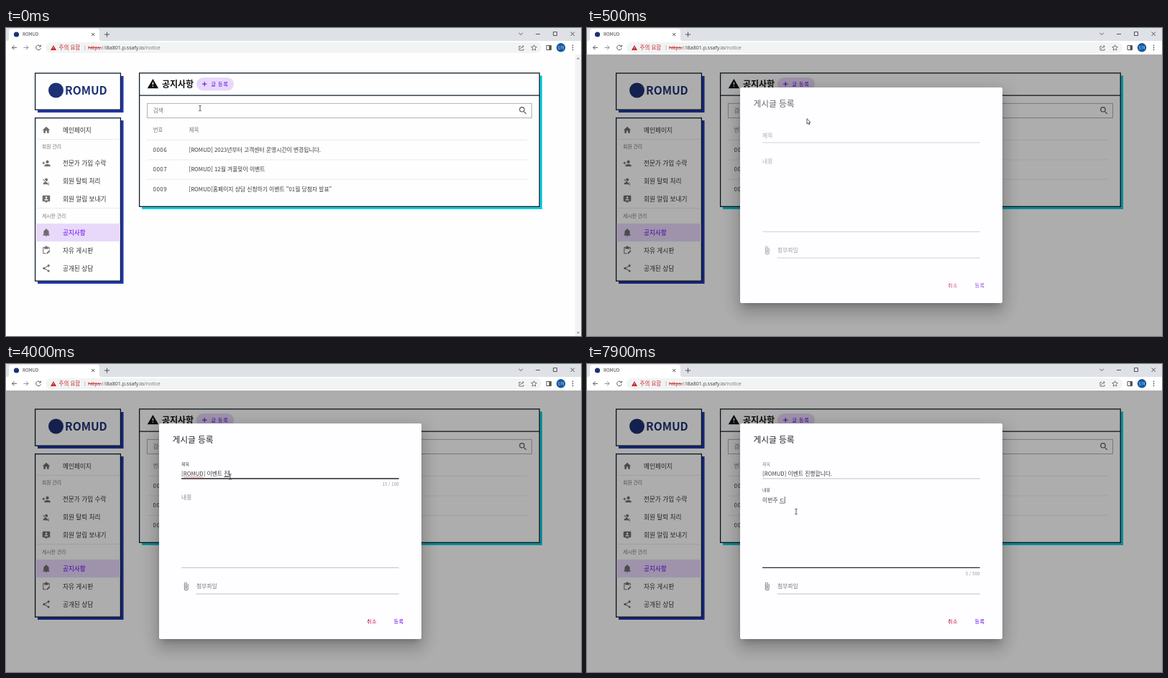
An HTML page for the animation above (8 s loop, 800 by 430 pixels).

```html
<!DOCTYPE html>
<html lang="ko">
<head>
<meta charset="utf-8">
<title>ROMUD</title>
<style>
html, body { margin: 0; width: 800px; height: 430px; overflow: hidden; background: #fefefe; }
body { position: relative; font-family: "Noto Sans CJK KR", "Noto Sans KR", "Open Sans", sans-serif; }
svg { position: absolute; left: 0; top: 0; display: block; }
text { white-space: pre; font-size: 7.8px; fill: #3c3c3e; }
.url { font: 7.04px "Open Sans", "Noto Sans", sans-serif; }
.line { fill: none; stroke: #555; stroke-width: 1; }
.box { fill: #fefefe; stroke: #0c1c28; stroke-width: 1.3; }
.rule { stroke: #e2e2e4; stroke-width: .7; }
.item { font-size: 8.65px; fill: #333; }
.group { font-size: 6.85px; fill: #777; }
.dim { fill: #77777a; }
.on { fill: #6200ee; }
.icon { fill: #6e6e70; fill-rule: evenodd; }
.btn { font-size: 7px; letter-spacing: .6px; font-weight: 500; }
.count { font-size: 5.8px; letter-spacing: .2px; fill: #8d8d90; text-anchor: end; }
.under { stroke: #a4a4a6; stroke-width: .7; }
.focus { stroke: #2c2c2e; stroke-width: 1.3; }
.typing { text-decoration: underline; text-decoration-thickness: .6px; text-underline-offset: 1.2px; }
#scrim { position: absolute; left: 0; top: 37px; width: 800px; height: 393px; background: #000; }
#dialog {
  position: absolute; left: 213.4px; top: 83.4px; width: 364.6px; height: 301px;
  background: #fefdff; border-radius: 2px;
  box-shadow: 0 6px 8px -4px #0003, 0 13px 20px 2px #00000024, 0 5px 25px 4px #0000001f;
}
</style>
</head>
<body>
<svg width="800" height="430">
  <!-- browser frame -->
  <rect width="800" height="18" fill="#dee1e6"/>
  <path d="M1 18q3 0 3-3V5q0-4 4-4H126q4 0 4 4V15q0 3 3 3z" fill="#fff"/>
  <circle cx="14.5" cy="9" r="3.6" fill="#1d3174"/>
  <text x="23" y="11.4" style="font-size:6.2px">ROMUD</text>
  <path class="line" d="M119.2 7l4 4m0-4l-4 4M137 9h7m-3.500-3.500v7"/>
  <path class="line" stroke-width=".8" d="M713.500 6.800l2.700 2.700 2.700-2.700M737 8.500h6M761.500 5.500h5v5h-5zM785.500 5.500l5.500 5.500m0-5.500l-5.500 5.500"/>
  <rect y="18" width="800" height="19" fill="#fff"/>
  <rect x="55" y="20" width="690" height="15" rx="7.500" fill="#f1f3f4"/>
  <path class="line" d="M15 27.300H8.500m3-3l-3 3 3 3"/>
  <path class="line" d="M24.500 27.300H31m-3-3l3 3-3 3" style="stroke:#888"/>
  <path class="line" d="M47.500 25.200a3.300 3.300 0 1 0 .7 3M48.300 23.500v2.500h-2.500"/>
  <path d="M66 24l4 7h-8zM65.600 26.300v2.300h.8v-2.300zM65.600 29.200v.8h.8v-.8z" fill="#c5221f" fill-rule="evenodd"/>
  <text x="73.500" y="30" style="font-size:7.5px;fill:#c5221f">주의 요함</text>
  <path d="M110 24v7" stroke="#aaa" stroke-width=".7"/>
  <text class="url" x="114" y="30.200"><tspan fill="#c5221f" text-decoration="line-through">https:</tspan><tspan fill="#777">//</tspan>i8a801.p.ssafy.io<tspan fill="#777">/notice</tspan></text>
  <path class="line" style="stroke-width:.8" d="M716 25.500h-2v5.500h6v-2M716 29q.3-3.300 4-3.300m-1.500-1.700l1.800 1.700-1.800 1.700"/>
  <path class="line" style="stroke-width:.8" d="M734.500 23.700l1.100 2.500 2.700.3-2 1.900.5 2.700-2.300-1.400-2.300 1.400.5-2.700-2-1.900 2.700-.3z"/>
  <path class="line" d="M752 24.500h6.500v6H752z"/><path d="M755.500 24.500h3v6h-3z" fill="#555"/>
  <circle cx="772" cy="27.300" r="6.200" fill="#1259a0"/>
  <text x="772" y="29" text-anchor="middle" style="font-size:4.6px;fill:#fff">도아</text>
  <g fill="#555"><circle cx="788.500" cy="24.300" r=".9"/><circle cx="788.500" cy="27.300" r=".9"/><circle cx="788.500" cy="30.300" r=".9"/></g>

  <g id="scrollbar"><rect x="791.500" y="37" width="8.500" height="393" fill="#f3f3f4"/><path d="M794 43.500l2-2.500 2 2.500zM794 424.500l2 2.500 2-2.500z" fill="#888"/></g>

  <!-- side column -->
  <g fill="#2036ab"><rect x="44" y="67" width="119.500" height="51"/><rect x="44" y="129" width="119.500" height="228"/></g>
  <rect class="box" x="40.600" y="63.100" width="118.800" height="51"/>
  <rect class="box" x="40.600" y="125.600" width="118.800" height="227.600"/>
  <circle cx="69.500" cy="87" r="10.500" fill="#1d3174"/>
  <text x="82" y="93" style="font-size:15.600px;font-weight:700;fill:#1d3174">ROMUD</text>
  <path class="rule" d="M41 155.500H159M41 251.500H159"/>
  <text class="group" x="50" y="168.300">회원 관리</text>
  <text class="group" x="50" y="264.700">게시판 관리</text>
  <rect x="41.300" y="273" width="117.500" height="25" fill="#e8d9fb"/>
  <g id="menu"></g>

  <!-- notice list -->
  <rect x="189" y="66.500" width="557" height="186.500" fill="#10ccdc"/>
  <rect class="box" x="185.600" y="62.900" width="556.600" height="186.400"/>
  <path d="M185 94.200H742" stroke="#0c1c28" stroke-width="1.200"/>
  <path transform="translate(196 69.500) scale(.7)" d="M1 21h22L12 2zM13 18h-2v-2h2zM13 14h-2V9h2z" fill="#111" fill-rule="evenodd"/>
  <text x="217" y="82.600" style="font-size:12px;font-weight:700;fill:#111">공지사항</text>
  <rect id="add" x="265" y="69" width="52" height="18.500" rx="9.250" fill="#e8d9fb"/>
  <path d="M273 78.200h6.400m-3.200-3.200v6.400" stroke="#6200ee"/>
  <text class="btn on" x="285.500" y="80.800">글 등록</text>
  <rect x="196.500" y="105.300" width="535" height="20.200" fill="none" stroke="#a0a0a2" stroke-width=".8"/>
  <text class="dim" x="204.700" y="118.200" style="font-size:7.700px">검색</text>
  <path class="line" style="stroke-width:1.200" d="M720.500 116.600l3.300 3.300"/><circle class="line" style="stroke-width:1.200" cx="717.900" cy="113.800" r="3.200"/>
  <text class="dim" x="204.700" y="145" style="font-size:7.500px">번호</text>
  <text class="dim" x="254.500" y="145" style="font-size:7.600px">제목</text>
  <path class="rule" d="M196 156.400H725M196 184H725M196 211.300H725"/>
  <g id="rows"></g>
</svg>

<div id="scrim"></div>
<div id="dialog">
  <svg id="form" width="364.600" height="301" viewBox="213.400 83.400 364.600 301">
    <text x="232" y="110.500" style="font-size:11.700px;font-weight:500;fill:#222">게시글 등록</text>
    <g id="fields"></g>
    <path class="icon" transform="translate(244.500 304.500) scale(.53)" d="M16.500 6v11.500a4 4 0 01-8 0V5a2.500 2.500 0 015 0v10.500a1 1 0 01-2 0V6H10v9.500a2.500 2.500 0 005 0V5a4 4 0 00-8 0v12.500a5.500 5.500 0 0011 0V6z"/>
    <text class="dim" x="265.500" y="313.700">첨부파일</text>
    <path class="under" d="M265 321.400H547"/>
    <text class="btn" x="502.500" y="362.500" style="fill:#b8002e">취소</text>
    <text class="btn on" x="540" y="362.500">등록</text>
  </svg>
</div>

<svg width="800" height="430">
  <g id="cursor" stroke-width=".8">
    <path data-kind="beam" d="M-1.800-3.800q1.800 0 1.800.8V3q0 .8-1.800.8M1.800-3.800Q0-3.800 0-3M0 3q0 .8 1.800.8" fill="none" stroke="#333"/>
    <path data-kind="arrow" d="M0 0V7.400L1.700 5.900 2.900 8.400 4 7.900 2.900 5.500H5z" fill="#fff" stroke="#333"/>
  </g>
</svg>

<script>
const LOOP = 8000, STEP = 100, NAME = 'ROMUD';
const $ = id => document.getElementById(id);
const clamp = v => Math.min(1, Math.max(0, v));
const ease = u => 1 - (1 - clamp(u)) ** 1.74;

const menu = [
  [142.5, '메인페이지', 'M10 20v-6h4v6h5v-8h3L12 3 2 12h3v8z'],
  [189, '전문가 가입 수락', 'M15 12a4 4 0 100-8 4 4 0 000 8zM6 10V7H4v3H1v2h3v3h2v-3h3v-2zM15 14c-2.700 0-8 1.300-8 4v2h16v-2c0-2.700-5.300-4-8-4z'],
  [214, '회원 탈퇴 처리', 'M12 4a4 4 0 014 4c0 1.950-1.400 3.600-3.250 3.900L8.100 7.250A4 4 0 0112 4zM12.300 14l6 6L20 21.700 18.700 23l-3-3H4v-2c0-1.800 2.500-3.400 5.900-3.900L2.800 7l1.300-1.200zM20 18v1.200l-4.900-4.900C18 14.900 20 16.350 20 18z'],
  [239, '회원 알림 보내기', 'M20 2H4a2 2 0 00-2 2v12a2 2 0 002 2h5l3 4 3-4h5a2 2 0 002-2V4a2 2 0 00-2-2zM12 5a2.500 2.500 0 110 5 2.500 2.500 0 010-5zM17 15H7v-.8c0-1.700 3.300-2.600 5-2.600s5 .9 5 2.600z'],
  [285.5, '공지사항', 'M21 19v1H3v-1l2-2v-6c0-3.100 2-5.800 5-6.700V4a2 2 0 014 0v.3c3 .9 5 3.600 5 6.700v6zM14 21a2 2 0 01-4 0z'],
  [310.5, '자유 게시판', 'M9 3a3 3 0 016 0h4a2 2 0 012 2v4l-2 2V5h-2v3H7V5H5v14h6v2H5a2 2 0 01-2-2V5a2 2 0 012-2zM20 11.500l2.500 2.500-7 7H13v-2.500z'],
  [335.5, '공개된 상담', 'M18 16.100c-.8 0-1.400.3-2 .8L8.900 12.700a3 3 0 000-1.400l7-4.100A3 3 0 1015 5c0 .24 0 .47.100.7L8 9.800A3 3 0 106 15c.8 0 1.500-.3 2-.8l7.100 4.200A2.900 2.900 0 1018 16.100z']
];
$('menu').innerHTML = menu.map(([y, label, d], i) => {
  const on = i === 4 ? ' on' : '';
  return `<path class="icon${on}" transform="translate(49.700 ${y - 6.3}) scale(.525)" d="${d}"/>
    <text class="item${on}" x="79" y="${y + 3.2}">${label}</text>`;
}).join('');

const rows = [
  ['0006', `[${NAME}] 2023년부터 고객센터 운영시간이 변경됩니다.`],
  ['0007', `[${NAME}] 12월 겨울맞이 이벤트`],
  ['0009', `[${NAME}]홈페이지 상담 신청하기 이벤트 "01월 당첨자 발표"`]
];
$('rows').innerHTML = rows.map(([no, title], i) => {
  const y = 173 + i * 27.3;
  return `<text x="204.500" y="${y}" style="font-size:8px;letter-spacing:.45px">${no}</text><text x="254.500" y="${y}">${title}</text>`;
}).join('');

// Keystrokes: a full syllable replaces the letter being composed, anything else is appended.
const keys = (start, gap, chars) => [...chars].map((ch, i) => [start + i * gap, ch]);
const isSyllable = ch => ch >= '가' && ch <= '힣';
const isHangul = ch => isSyllable(ch) || (ch >= 'ㄱ' && ch <= 'ㅣ');

const fields = [
  { label: '제목', top: 153, low: 160.4, max: 100, from: 1000, to: 5100, keys: [
    ...keys(1500, 200, `[${NAME}]`),
    ...keys(2900, 100, ' ㅇ이ㅂ버벤ㅌ트 ㅈ지진'),
    ...keys(4100, 60, 'ㅎ해행ㅎ하합ㄴ니ㄷ다.')] },
  { label: '내용', top: 189.6, low: 284.8, max: 500, from: 5100, to: LOOP, keys: [
    ...keys(5700, 100, 'ㅇ이'),
    ...keys(6200, 270, 'ㅂ버번ㅈ주 ㄷ')] }
];
$('fields').innerHTML = fields.map(f => `<g>
  <path class="under" d="M244.500 ${f.low}H547"/><path class="focus"/>
  <text class="label"></text>
  <text class="value" x="244.500" y="${f.top + 3.5}"><tspan></tspan><tspan class="typing"></tspan></text>
  <path class="squiggle" fill="none" stroke="#e0303a" stroke-width=".7"/>
  <path class="caret" stroke="#222" stroke-width=".7"/>
  <text class="count" x="547" y="${f.low + 10.3}"></text></g>`).join('');
fields.forEach((f, i) => {
  const g = $('fields').children[i];
  for (const k of ['focus', 'label', 'value', 'squiggle', 'caret', 'count']) f[k] = g.querySelector('.' + k);
  f.label_ = f.label.textContent = f.keys && ['제목', '내용'][i];
});

function drawField(f, t) {
  const focused = t >= f.from && t < f.to;
  const q = clamp((t - f.from) / 150);
  const done = f.keys.filter(k => k[0] <= t);
  const text = done.reduce((s, [, ch]) => (isSyllable(ch) ? s.slice(0, -1) : s) + ch, '');
  const composing = focused && isHangul(text.slice(-1)) ? 1 : 0;
  const cut = text.length - composing;
  f.value.children[0].textContent = text.slice(0, cut);
  f.value.children[1].textContent = text.slice(cut);

  f.label.setAttribute('transform', `translate(244.500 ${f.top - 11 * q}) scale(${1 - .25 * q})`);
  f.label.style.fill = focused ? '#444' : '#8b8b8e';
  f.focus.setAttribute('d', focused ? `M${395.75 - 151.25 * q} ${f.low}H${395.75 + 151.25 * q}` : '');
  f.count.textContent = focused ? `${text.length} / ${f.max}` : '';

  const last = done.length ? done[done.length - 1][0] : f.from;
  const lit = focused && Math.floor((t - last) / 500) % 2 === 0;
  const x = 244.5 + (text ? f.value.getComputedTextLength() : 0) + .3;
  f.caret.setAttribute('d', lit ? `M${x} ${f.top - 4}v9` : '');

  const wavy = focused && text.startsWith(`[${NAME}] `);
  f.squiggle.setAttribute('d', wavy ? `M247.500 ${f.top + 5}` + 'q.75-1.500 1.500 0t1.500 0'.repeat(9) : '');
}

const path = [
  [0, 270, 112, 'beam'], [200, 288, 88, 'arrow'], [300, 291, 84, 'arrow'], [400, 291, 84, 'arrow'],
  [500, 306, 126.5, 'arrow'], [800, 312, 157.5, 'beam'], [4700, 312, 157.5, 'beam'], [5000, 291, 206, 'beam'], [LOOP, 291, 206, 'beam']
];
function drawCursor(t) {
  const i = path.findIndex(p => p[0] > t) - 1;
  const [t0, x0, y0, kind] = path[i], [t1, x1, y1] = path[i + 1];
  const u = (t - t0) / (t1 - t0);
  $('cursor').setAttribute('transform', `translate(${x0 + (x1 - x0) * u} ${y0 + (y1 - y0) * u})`);
  for (const c of $('cursor').children) c.style.display = c.dataset.kind === kind ? '' : 'none';
}

// The dialog grows out of the add button.
function drawDialog(t) {
  const u = clamp((t - 300) / 200), p = ease(u);
  $('scrim').style.opacity = .32 * u ** .7;
  $('scrollbar').style.display = u ? 'none' : '';
  $('add').style.fill = t >= 200 && t < 500 ? '#d6c0f2' : '';
  $('dialog').style.opacity = p;
  $('dialog').style.transform =
    `translate(${(1 - p) * -104.7}px, ${(1 - p) * -155.5}px) scale(${.14 + .86 * p}, ${.06 + .94 * p})`;
  $('form').style.opacity = ease((t - 400) / 200);
}

const start = performance.now();
function frame() {
  const t = Math.floor((performance.now() - start) % LOOP / STEP) * STEP;
  drawDialog(t);
  fields.forEach(f => drawField(f, t));
  drawCursor(t);
  requestAnimationFrame(frame);
}
frame();
</script>
</body>
</html>
```
